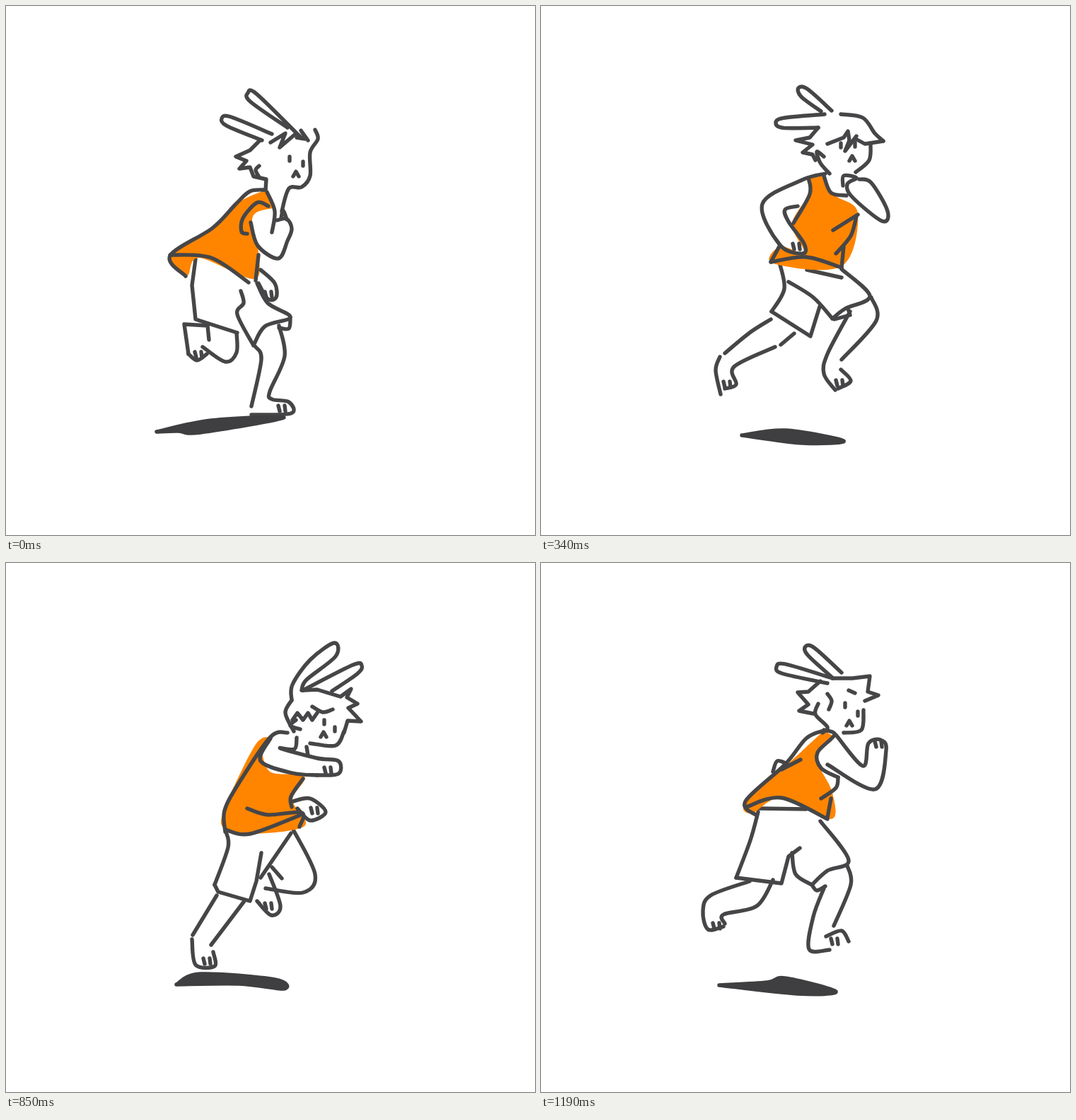
An HTML page with a canvas for the animation above (1.36 s loop, 748 by 748 pixels).

```html
<!DOCTYPE html>
<html lang="en">
<head>
<meta charset="utf-8">
<title>Running rabbit</title>
<style>
  html, body { margin: 0; width: 100%; height: 100%; overflow: hidden; background: #fff; }
  canvas { display: block; }
</style>
</head>
<body>
<canvas width="748" height="748"></canvas>
<script>
const INK = '#464648', SHADE = '#3f3f41', ORANGE = '#ff8500', HOLD = 170;
const ctx = document.querySelector('canvas').getContext('2d');
ctx.lineCap = ctx.lineJoin = 'round';
ctx.lineWidth = 5.4;
ctx.strokeStyle = INK;

// Smooth path through x, y pairs.
function trace(...p) {
  const at = i => Math.max(0, Math.min(p.length - 2, i * 2));
  ctx.beginPath();
  ctx.moveTo(p[0], p[1]);
  for (let i = 1; i < p.length / 2; i++) {
    const a = at(i - 2), b = at(i - 1), c = at(i), d = at(i + 1);
    ctx.bezierCurveTo(p[b] + (p[c] - p[a]) / 6, p[b + 1] + (p[c + 1] - p[a + 1]) / 6,
      p[c] - (p[d] - p[b]) / 6, p[c + 1] - (p[d + 1] - p[b + 1]) / 6, p[c], p[c + 1]);
  }
}
function curve(...p) { trace(...p); ctx.stroke(); }
function poly(...p) {
  ctx.beginPath();
  for (let i = 0; i < p.length; i += 2) ctx.lineTo(p[i], p[i + 1]);
  ctx.stroke();
}
function shirt(...p) { trace(...p); ctx.fillStyle = ORANGE; ctx.fill(); }
function shadow(...p) {
  ctx.fillStyle = ctx.strokeStyle = SHADE;
  curve(...p, p[0], p[1]);
  ctx.fill();
  ctx.strokeStyle = INK;
}
// Rounded loop from a around the tip to b.
function ear(x, y, ax, ay, bx, by) {
  const dx = (ax + bx) / 2 - x, dy = (ay + by) / 2 - y, len = Math.hypot(dx, dy);
  const ux = dx / len, uy = dy / len;
  const side = 7 * Math.sign((bx - ax) * uy - (by - ay) * ux);
  const sx = -uy * side, sy = ux * side, nx = x + ux * 11, ny = y + uy * 11;
  curve(ax, ay, nx + sx, ny + sy, x, y, nx - sx, ny - sy, bx, by);
}
function eyes(x1, y1, x2, y2) { poly(x1, y1, x1, y1 + 6); poly(x2, y2, x2, y2 + 6); }
function mouth(x, y) { poly(x - 4, y + 5, x, y - 2, x + 4, y + 5); }
function toes(x, y) { poly(x, y, x + 2, y + 8); poly(x + 9, y, x + 10, y + 8); }

function landingTop() {
  shirt(367, 260, 325, 280, 292, 316, 234, 353, 256, 381, 273, 356, 350, 386, 357, 350, 348, 308, 354, 292, 377, 286);
  ear(305, 159, 362, 190, 376, 181);
  ear(342, 123, 398, 172, 418, 187);
  poly(374, 193, 395, 180, 387, 200, 408, 182);
  poly(411, 186, 424, 188, 417, 176, 427, 190);
  curve(437, 175, 441, 188, 430, 207, 430, 240, 418, 256, 400, 258, 390, 290);
  eyes(401, 213, 420, 220);
  mouth(410, 236);
  poly(359, 190, 345, 204, 325, 213, 340, 219, 330, 230, 345, 228, 350, 241, 368, 245, 367, 260);
  curve(358, 226, 353, 232, 358, 242);
  curve(367, 260, 345, 262, 325, 280, 292, 314, 232, 353, 254, 382);
  curve(232, 352, 290, 356, 343, 391);
  curve(369, 263, 380, 290, 376, 320);
  curve(371, 283, 355, 278, 335, 300, 333, 319, 341, 322);
  curve(346, 306, 356, 339, 385, 357, 398, 332, 404, 315, 397, 301, 383, 303);
  curve(389, 300, 392, 289, 397, 302);
  poly(357, 352, 353, 388);
  curve(360, 373, 380, 392, 382, 412, 370, 414, 357, 392);
  toes(366, 404);
}
function landingLegs() {
  poly(268, 358, 263, 395, 268, 443, 327, 462);
  curve(332, 403, 336, 420, 327, 436, 350, 480);
  curve(350, 480, 366, 453, 402, 440, 370, 420, 355, 392);
  curve(402, 440, 400, 456, 386, 455);
  poly(258, 492, 252, 450, 285, 452, 287, 472);
  curve(258, 492, 270, 501, 284, 492);
  toes(267, 489);
  curve(278, 482, 310, 503, 326, 490, 326, 462);
  curve(353, 482, 361, 500, 347, 566);
  curve(386, 452, 394, 495, 373, 545, 376, 556, 400, 560, 403, 576, 347, 578);
  toes(385, 565);
  shadow(213, 602, 290, 586, 393, 582, 275, 603, 243, 601);
}

function pushTop() {
  shirt(374, 260, 346, 288, 366, 302, 354, 331, 384, 348, 350, 353, 284, 371, 292, 383, 330, 372, 402, 397, 411, 384, 400, 350, 433, 281, 408, 295, 388, 284);
  ear(319, 157, 383, 191, 398, 183);
  ear(305, 198, 377, 199, 372, 213);
  poly(398, 182, 420, 190, 432, 190, 438, 179, 446, 197, 451, 180, 459, 203);
  poly(456, 210, 466, 222, 450, 228);
  curve(447, 236, 444, 262, 427, 273, 404, 267);
  eyes(414, 237, 437, 237);
  mouth(423, 256);
  poly(370, 214, 352, 220, 366, 222, 368, 235, 354, 241, 375, 242);
  poly(370, 234, 366, 252, 391, 255);
  curve(376, 258, 360, 266, 335, 295);
  curve(374, 258, 395, 291, 412, 292, 414, 278);
  curve(416, 280, 431, 277, 434, 292, 400, 350, 395, 372);
  curve(345, 290, 364, 292, 364, 318);
  curve(338, 293, 304, 330, 320, 346, 358, 352);
  curve(332, 332, 372, 333, 382, 353, 362, 356);
  toes(367, 346);
  curve(428, 312, 482, 341, 490, 358);
  curve(416, 330, 455, 347, 465, 358, 490, 358);
  toes(468, 348);
  curve(310, 348, 284, 370, 335, 371, 400, 398, 408, 385, 397, 364);
  curve(348, 372, 385, 380, 395, 370);
}
function pushLegs() {
  curve(308, 372, 296, 392, 312, 440, 322, 458, 350, 454, 383, 440);
  curve(330, 405, 375, 433, 402, 455);
  poly(340, 432, 383, 438);
  curve(392, 403, 392, 418, 378, 437);
  curve(383, 442, 407, 475, 385, 496, 350, 484);
  curve(341, 459, 367, 474);
  curve(322, 460, 318, 480, 328, 509, 350, 490);
  toes(333, 494);
  poly(355, 495, 366, 511, 372, 492);
  curve(320, 487, 288, 535, 281, 566, 297, 585);
  curve(335, 513, 312, 549);
  curve(306, 563, 317, 580, 299, 586, 299, 573);
  shadow(241, 612, 290, 592, 346, 601, 397, 607, 268, 613);
}

function leapTop() {
  shirt(400, 240, 415, 267, 448, 293, 425, 368, 328, 364, 338, 340, 372, 348, 355, 308, 382, 262, 378, 244);
  ear(364, 116, 396, 149, 411, 148);
  ear(332, 166, 401, 153, 392, 172);
  curve(424, 153, 455, 158, 472, 180, 484, 191);
  poly(484, 191, 458, 195, 447, 189);
  poly(405, 195, 428, 186, 434, 177, 436, 190, 430, 205, 446, 184);
  eyes(424, 194, 444, 193);
  mouth(440, 214);
  curve(466, 194, 464, 218, 445, 235);
  poly(392, 172, 380, 186, 360, 190, 384, 196, 370, 207, 384, 210, 388, 218);
  curve(400, 213, 390, 206, 395, 222, 408, 237);
  curve(402, 237, 369, 246, 313, 280, 338, 338, 370, 350, 372, 336, 350, 305, 345, 288, 363, 283);
  curve(400, 240, 410, 264, 432, 268);
  curve(378, 243, 380, 266, 357, 307);
  toes(356, 336);
  curve(427, 254, 428, 240, 446, 243, 433, 252, 440, 270, 482, 304, 490, 290, 467, 250, 450, 245);
  poly(448, 295, 413, 317);
  curve(446, 297, 438, 325, 417, 350);
  poly(428, 340, 425, 370);
  poly(338, 338, 325, 362);
  curve(325, 362, 375, 355, 425, 370);
}
function leapLegs() {
  curve(337, 362, 344, 400, 326, 432);
  poly(326, 432, 381, 467, 394, 425);
  curve(350, 390, 385, 412, 412, 442);
  curve(412, 442, 430, 428, 465, 410, 425, 372);
  curve(376, 373, 425, 384);
  poly(434, 428, 437, 437, 415, 443);
  curve(325, 443, 295, 462, 260, 491);
  curve(358, 463, 339, 479);
  curve(331, 482, 273, 510, 276, 535, 260, 541);
  curve(253, 496, 247, 515, 254, 549);
  toes(258, 531);
  curve(467, 412, 474, 445, 425, 500);
  curve(437, 432, 405, 492, 400, 520, 416, 543);
  curve(424, 514, 438, 530, 420, 541);
  toes(417, 529);
  shadow(284, 607, 346, 600, 428, 615, 370, 618);
}

function stanceTop() {
  shirt(360, 256, 378, 258, 382, 305, 410, 385, 380, 392, 357, 372, 328, 303, 356, 285);
  shirt(309, 335, 283, 378, 334, 373);
  shirt(424, 290, 410, 312, 429, 296);
  ear(288, 214, 359, 207, 322, 221);
  ear(302, 240, 355, 212, 365, 228);
  curve(358, 207, 365, 192, 405, 178, 420, 167, 440, 171);
  poly(433, 173, 450, 186, 466, 196, 452, 197, 458, 210, 440, 208);
  curve(411, 189, 400, 195, 388, 216);
  curve(424, 183, 436, 190, 442, 205);
  eyes(416, 206, 433, 217);
  mouth(424, 230);
  curve(439, 222, 438, 242, 416, 248, 408, 258);
  curve(382, 218, 370, 222, 379, 232);
  curve(358, 210, 370, 234, 387, 246);
  curve(358, 255, 375, 252, 382, 288, 400, 295, 418, 290);
  curve(408, 264, 424, 285, 410, 308);
  curve(357, 256, 358, 285, 332, 303);
  curve(354, 260, 296, 290, 300, 310, 335, 366, 356, 362, 345, 338, 325, 298);
  toes(341, 347);
  curve(384, 313, 381, 298, 402, 297, 408, 308, 398, 316);
  curve(383, 313, 410, 368, 423, 355, 422, 305);
  curve(309, 335, 281, 376, 300, 384, 335, 375);
  curve(358, 375, 408, 385, 378, 398);
}
function stanceLegs() {
  curve(299, 386, 330, 445, 343, 465);
  curve(343, 465, 375, 442, 405, 443);
  curve(377, 395, 385, 424, 408, 446, 405, 460, 383, 455);
  curve(335, 420, 385, 418);
  curve(348, 386, 380, 417);
  poly(317, 432, 316, 455);
  curve(322, 458, 285, 460, 285, 495, 300, 512);
  curve(318, 498, 305, 513);
  curve(295, 483, 345, 490, 353, 480);
  toes(297, 496);
  curve(348, 463, 350, 500, 336, 560);
  curve(380, 447, 393, 485, 361, 557);
  curve(334, 568, 345, 587, 388, 580, 382, 562, 357, 568);
  toes(370, 569);
  shadow(269, 594, 290, 588, 352, 593, 405, 608, 325, 602);
}

function leanTop() {
  shirt(374, 246, 352, 258, 310, 345, 308, 375, 345, 383, 422, 372, 405, 335, 422, 302, 375, 296, 362, 270);
  curve(404, 194, 405, 172, 430, 137, 464, 113, 466, 132, 425, 165, 418, 180);
  ear(503, 145, 420, 180, 461, 181);
  curve(404, 194, 395, 212, 407, 238);
  poly(420, 180, 440, 179, 473, 189, 488, 178, 482, 190, 497, 199, 484, 205, 502, 224, 483, 223, 478, 240);
  poly(405, 222, 412, 212, 420, 222, 427, 212, 433, 222, 440, 212);
  curve(433, 203, 448, 211, 462, 207);
  eyes(450, 222, 465, 232);
  mouth(449, 241);
  curve(478, 238, 466, 258, 430, 255);
  curve(410, 222, 402, 230, 416, 235);
  curve(398, 240, 374, 246, 330, 310, 309, 350, 310, 380);
  curve(411, 247, 408, 263, 388, 262, 440, 276, 470, 280, 470, 298, 440, 300);
  curve(425, 260, 427, 272);
  curve(374, 248, 360, 280, 405, 297, 440, 300);
  toes(450, 289);
  curve(420, 305, 403, 330, 404, 345);
  curve(406, 337, 430, 333, 452, 352, 430, 364, 412, 347);
  toes(431, 346);
  curve(341, 347, 370, 356, 418, 353, 415, 373);
  curve(310, 377, 345, 383, 415, 357);
}
function leanLegs() {
  curve(311, 380, 314, 402, 295, 455);
  poly(295, 455, 300, 465, 345, 478, 354, 450, 361, 410);
  poly(403, 382, 360, 445);
  curve(405, 375, 437, 440, 420, 466, 367, 460);
  curve(376, 430, 390, 446);
  curve(372, 440, 388, 485, 375, 498, 355, 478);
  toes(366, 481);
  curve(298, 470, 264, 526);
  curve(337, 478, 290, 540);
  curve(263, 532, 268, 568, 295, 570, 293, 550);
  toes(279, 559);
  shadow(241, 596, 275, 581, 380, 589, 393, 602, 330, 595);
}

function flightTop() {
  shirt(400, 237, 345, 288, 289, 338, 298, 354, 340, 332, 410, 362, 412, 325, 395, 290, 392, 265, 412, 244);
  ear(374, 118, 412, 162, 425, 155);
  ear(333, 147, 412, 163, 405, 170);
  poly(412, 163, 440, 163, 465, 160, 462, 182, 477, 187, 458, 195);
  curve(405, 185, 411, 195, 407, 207);
  poly(435, 180, 444, 184);
  eyes(430, 198, 448, 210);
  mouth(436, 225);
  curve(456, 208, 453, 236, 428, 240);
  poly(395, 167, 378, 182, 363, 183, 378, 200, 365, 209, 385, 213);
  curve(392, 199, 388, 214, 405, 232, 398, 240);
  curve(400, 237, 375, 248, 345, 285, 289, 337, 305, 357);
  curve(328, 295, 334, 280, 348, 284);
  curve(340, 292, 367, 278);
  curve(400, 236, 415, 243, 391, 268, 396, 290, 420, 303);
  curve(420, 303, 417, 318, 396, 333);
  poly(410, 333, 405, 360);
  curve(290, 345, 340, 332, 405, 362);
  curve(417, 243, 455, 287, 463, 255, 480, 250, 488, 265, 472, 320, 405, 285);
  toes(472, 252);
}
function flightLegs() {
  poly(307, 347, 375, 348);
  curve(307, 352, 296, 392, 276, 445);
  poly(276, 445, 340, 453, 350, 415, 366, 403);
  curve(355, 410, 360, 440, 383, 455);
  curve(383, 455, 405, 435, 435, 420, 395, 365);
  curve(383, 455, 390, 463, 402, 457);
  curve(295, 450, 240, 470, 229, 492, 236, 518, 258, 514);
  curve(328, 448, 305, 485, 258, 497, 260, 510);
  toes(243, 509);
  curve(433, 428, 438, 455, 414, 513);
  curve(400, 460, 385, 500, 379, 546, 408, 547);
  curve(403, 528, 425, 520, 435, 535);
  toes(410, 531);
  shadow(252, 597, 320, 593, 345, 587, 417, 606, 362, 609);
}

function shifted(x, y, paint) {
  ctx.save();
  ctx.translate(x, y);
  paint();
  ctx.restore();
}

const poses = [
  () => { landingLegs(); landingTop(); },
  () => { pushLegs(); pushTop(); },
  () => { leapLegs(); leapTop(); },
  () => { shifted(50, 8, landingLegs); shifted(-12, 35, leapTop); },
  () => { stanceLegs(); stanceTop(); },
  () => { leanLegs(); leanTop(); },
  () => { shifted(-28, -6, leapLegs); shifted(16, 2, flightTop); },
  () => { flightLegs(); flightTop(); }
];

const start = performance.now();
function tick() {
  ctx.clearRect(0, 0, 748, 748);
  poses[Math.floor((performance.now() - start) / HOLD) % poses.length]();
  requestAnimationFrame(tick);
}
tick();
</script>
</body>
</html>
```
